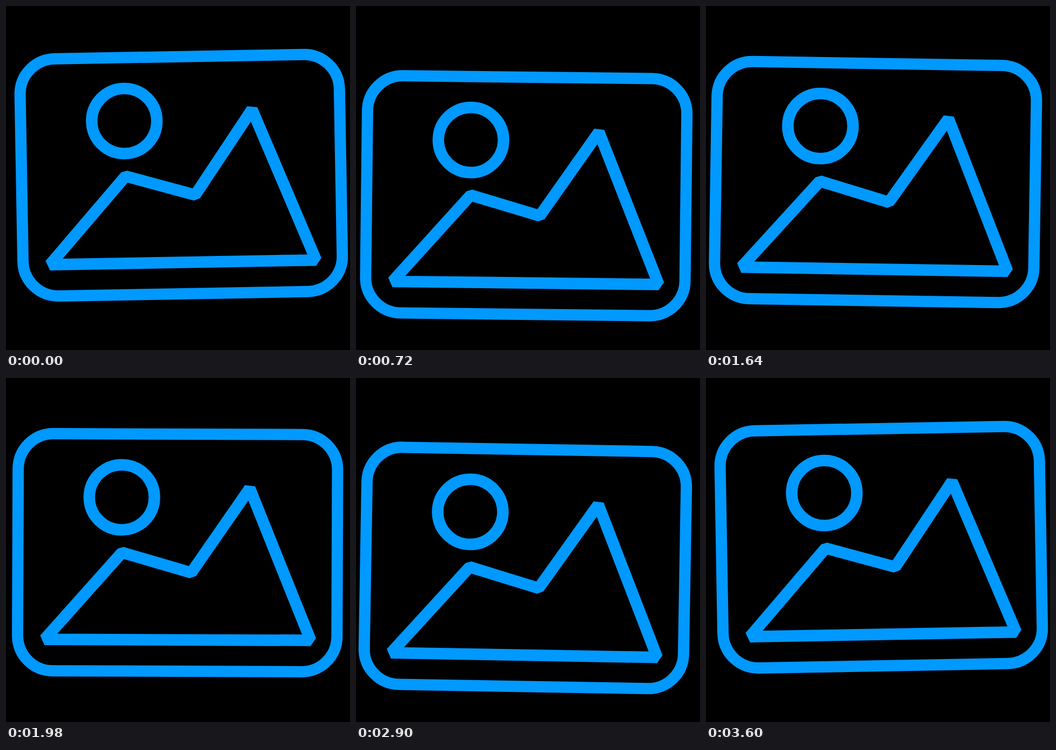
An HTML page that plays this animation: 640 by 640 pixels, repeating every 3.62 s.

```html
<!DOCTYPE html>
<html lang="en">
<head>
<meta charset="utf-8">
<title>Swaying picture icon</title>
<style>
  html, body { margin: 0; width: 100%; height: 100%; overflow: hidden; background: #000; }
  svg { display: block; width: 100%; height: 100%; }
</style>
</head>
<body>
<svg viewBox="0 0 640 640">
  <g id="icon" fill="none" stroke="#09f" stroke-width="21.5" stroke-linejoin="bevel">
    <rect x="23.3" y="99.8" width="594.2" height="441.2" rx="65.5" stroke-width="21"/>
    <circle cx="216.3" cy="217.8" r="60.6"/>
    <path d="M73.4 482.6 L217 320.4 L345.9 357.6 L454.2 200.4 L568.5 482.6 Z"/>
  </g>
</svg>
<script>
  const LOOP = 3620, LEAD = 10;
  const icon = document.getElementById('icon');

  // Cubic Bezier easing with control points (x1, 0) and (x2, 1).
  function bezier(x1, x2) {
    return x => {
      let lo = 0, hi = 1, s;
      for (let i = 0; i < 24; i++) {
        s = (lo + hi) / 2;
        const r = 1 - s;
        if (3 * x1 * s * r * r + 3 * x2 * s * s * r + s ** 3 < x) lo = s;
        else hi = s;
      }
      return s * s * (3 - 2 * s);
    };
  }

  // Goes 0 to 1 and back, easing each way over `half` ms.
  function alternate(t, half, ease) {
    const p = ease((t % half) / half);
    return Math.floor(t / half) % 2 ? 1 - p : p;
  }

  const tiltEase = bezier(0.36, 0.28);
  const bobEase = x => (1 - Math.cos(Math.PI * x)) / 2;

  function draw() {
    const t = performance.now() % LOOP + LEAD;
    const angle = 2 * alternate(t, 600, tiltEase) - 1;
    const y = 31.7 * alternate(t, 900, bobEase);
    icon.setAttribute('transform', `translate(0 ${y}) rotate(${angle})`);
    requestAnimationFrame(draw);
  }
  draw();
</script>
</body>
</html>
```
